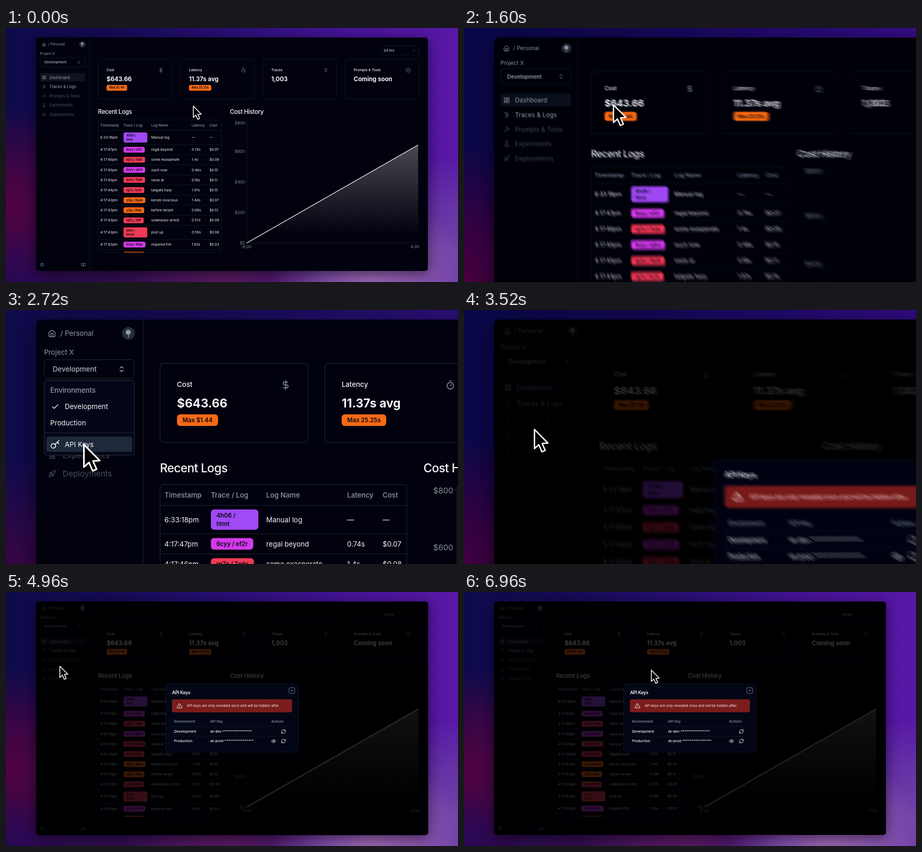
An HTML page with a canvas for the animation above (7.04 s loop, 856x482 px).

```html
<!DOCTYPE html>
<html lang="en">
<head>
<meta charset="utf-8">
<title>Dashboard</title>
<style>
html, body { margin: 0; width: 100%; height: 100%; overflow: hidden; background: #0d0a4c; }
canvas { display: block; width: 856px; height: 482px; }
</style>
</head>
<body>
<canvas id="stage" width="856" height="482"></canvas>
<script>
const W = 856, H = 482, LOOP = 7040, STEP = 80;
const OX = 57, OY = 17.7; // zoom anchor: top left of the window
const out = document.getElementById('stage').getContext('2d');
const layer = document.createElement('canvas');
layer.width = 940;
layer.height = 540;
const g = layer.getContext('2d');

const SM = 6.6, MD = 7.55, LG = 8.5, XL = 11.33, XS = 5.66;
const WHITE = '#f5f7fb', MUTED = '#929aa8', DIM = '#484d58', LINE = '#181e2b', BG = '#01020e';
const PURPLE = '#a049f4', PINK = '#d23aea', RED = '#f03a55', ORANGE = '#f66a14';

const RING = 'M22 12a10 10 0 1 1-20 0a10 10 0 0 1 20 0z';
const ICONS = {
  home: 'M3 9l9-7 9 7v11a2 2 0 0 1-2 2H5a2 2 0 0 1-2-2zM9 22V12h6v10',
  grid: 'M3 3h7v9H3zM14 3h7v5h-7zM14 12h7v9h-7zM3 16h7v5H3z',
  traces: 'M4 5h11M9 12h11M7 19h9',
  hammer: 'M15 12l-8.5 8.5a2.1 2.1 0 0 1-3-3L12 9M17.6 15L22 10.6M20.9 11.7L18.7 8.2v-.8L16 4.6A5.6 5.6 0 0 0 12 3H9l.9.8A6.2 6.2 0 0 1 12 8.4V10l2 2h2.5l2.3 1.9',
  flask: 'M10 2v7.3L4 20a1.5 1.5 0 0 0 1.3 2h13.4a1.5 1.5 0 0 0 1.3-2L14 9.3V2M8.5 2h7M7 16h10',
  rocket: 'M4.5 16.5c-1.5 1.3-2 5-2 5s3.7-.5 5-2a2.1 2.1 0 0 0-3-3zM12 15l-3-3a22 22 0 0 1 2-4A13 13 0 0 1 22 2c0 2.7-.8 7.5-6 11a22 22 0 0 1-4 2zM9 12H4s.6-3 2-4c1.6-1.1 5 0 5 0M12 15v5s3-.6 4-2c1.1-1.6 0-5 0-5',
  updown: 'M7 15l5 5 5-5M7 9l5-5 5 5',
  dollar: 'M12 1v22M17 5H9.5a3.5 3.5 0 0 0 0 7h5a3.5 3.5 0 0 1 0 7H6',
  timer: 'M10 2h4M12 14l3-3M20 14a8 8 0 1 1-16 0a8 8 0 0 1 16 0z',
  alert: RING + 'M12 7v5M12 16v.2',
  help: RING + 'M9 9a3 3 0 0 1 5.8 1c0 2-3 3-3 3M12 17v.2',
  book: 'M2 4h6a4 4 0 0 1 4 4v13a3 3 0 0 0-3-3H2zM22 4h-6a4 4 0 0 0-4 4v13a3 3 0 0 1 3-3h7z',
  check: 'M20 6L9 17l-5-5',
  key: 'M11.2 12.8L21 3M17 7l3.5 3.5M13 16a5.5 5.5 0 1 1-11 0a5.5 5.5 0 0 1 11 0z',
  close: 'M18 6L6 18M6 6l12 12',
  warn: 'M10.3 3.9L1.8 18a2 2 0 0 0 1.7 3h17a2 2 0 0 0 1.7-3L13.7 3.9a2 2 0 0 0-3.4 0zM12 9v4M12 17v.2',
  refresh: 'M3 12a9 9 0 0 1 15-6.7L21 8M21 3v5h-5M21 12a9 9 0 0 1-15 6.7L3 16M3 21v-5h5',
  eye: 'M2 12s3-7 10-7 10 7 10 7-3 7-10 7-10-7-10-7zM15 12a3 3 0 1 1-6 0a3 3 0 0 1 6 0z'
};
for (const k in ICONS) ICONS[k] = new Path2D(ICONS[k]);

const LOGS = [
  ['6:33:18pm', '4h06 / htmt', 'Manual log', '—', '—', PURPLE, 2],
  ['4:17:47pm', '6cyy / ef2r', 'regal beyond', '0.74s', '$0.07', PINK],
  ['4:17:46pm', 'rg7x / 7xde', 'some exasperate', '1.4s', '$0.08', RED],
  ['4:17:45pm', '6cyy / g6ol', 'ouch now', '0.46s', '$0.15', PINK],
  ['4:17:45pm', 'qykx / 5pi6', 'seize at', '0.18s', '$0.11', RED],
  ['4:17:44pm', 'rg7x / bcih', 'tailgate harp', '1.97s', '$0.15', RED],
  ['4:17:43pm', 'y2ju / 9qub', 'kendo vivacious', '1.44s', '$0.07', ORANGE],
  ['4:17:43pm', 'y2ju / 8hkj', 'before tenant', '0.09s', '$0.13', ORANGE],
  ['4:17:43pm', 'rg7x / 7dff', 'underpass arrest', '0.57s', '$0.09', RED],
  ['4:17:43pm', 'qykx / bevm', 'psst up', '0.59s', '$0.08', RED, 2],
  ['4:17:42pm', '6cyy / 85ar', 'required fire', '1.83s', '$0.03', PINK],
  ['4:17:42pm', 'y2ju / 3kfa', 'plain river', '0.66s', '$0.06', ORANGE]
];

const clamp = v => Math.max(0, Math.min(1, v));
const ramp = (t, a, b) => clamp((t - a) / (b - a));
const smooth = p => p * p * p * (p * (6 * p - 15) + 10);

// y is the vertical centre of the capitals
function text(s, x, y, size, color = WHITE, weight = 400, align = 'left', track = 0) {
  g.font = `${weight} ${size}px Inter, sans-serif`;
  g.letterSpacing = track * size + 'px';
  g.textAlign = align;
  g.fillStyle = color;
  g.fillText(s, x, y + size * 0.36);
}

function box(x, y, w, h, r, fill, stroke) {
  g.beginPath();
  g.roundRect(x, y, w, h, r);
  if (fill) { g.fillStyle = fill; g.fill(); }
  if (stroke) { g.strokeStyle = stroke; g.lineWidth = 0.7; g.stroke(); }
}

function line(x1, y1, x2, y2, color = LINE, width = 0.7) {
  g.beginPath();
  g.moveTo(x1, y1);
  g.lineTo(x2, y2);
  g.strokeStyle = color;
  g.lineWidth = width;
  g.stroke();
}

function icon(name, x, y, size, color, weight = 2) {
  g.save();
  g.translate(x - size / 2, y - size / 2);
  g.scale(size / 24, size / 24);
  g.strokeStyle = color;
  g.lineWidth = weight;
  g.lineCap = g.lineJoin = 'round';
  g.stroke(ICONS[name]);
  g.restore();
}

function badge(s, x, y, color, lines = 1) {
  g.font = `600 ${XS}px Inter, sans-serif`;
  g.letterSpacing = '0px';
  const ink = '#0a0815';
  if (lines === 2) {
    const parts = s.split('/ ');
    box(x, y - 9.6, 45, 19.2, 3, color);
    text(parts[0] + '/', x + 5.2, y - 3.8, XS, ink, 600);
    text(parts[1], x + 5.2, y + 3.9, XS, ink, 600);
  } else {
    box(x, y - 5.5, g.measureText(s).width + 10.4, 11, 3, color);
    text(s, x + 5.2, y, XS, ink, 600);
  }
}

function backdrop() {
  const lin = g.createLinearGradient(0, 0, W, 0);
  [[0, '#0d0a4a'], [0.25, '#160a58'], [0.5, '#2a0f78'], [0.75, '#46139a'], [1, '#5918a6']]
    .forEach(([p, c]) => lin.addColorStop(p, c));
  g.fillStyle = lin;
  g.fillRect(-60, -60, 1100, 700);
  [[200, 500, 300, '50,12,78'], [0, 335, 190, '82,3,66'], [0, 500, 120, '42,8,88'],
   [420, 500, 210, '92,26,96'], [856, 430, 190, '112,68,166'], [690, 500, 190, '160,108,180']]
    .forEach(([x, y, r, c]) => {
      const rad = g.createRadialGradient(x, y, 0, x, y, r);
      rad.addColorStop(0, `rgba(${c},1)`);
      rad.addColorStop(0.5, `rgba(${c},.6)`);
      rad.addColorStop(1, `rgba(${c},0)`);
      g.fillStyle = rad;
      g.fillRect(x - r, y - r, 2 * r, 2 * r);
    });
}

function sidebar(hover) {
  line(158.5, 18, 158.5, 461, '#141822');
  icon('home', 72, 31, 7.6, MUTED);
  text('/ Personal', 80, 31, SM, MUTED);
  g.fillStyle = '#282d39';
  g.beginPath(); g.arc(144.5, 31, 6, 0, 7); g.fill();
  g.fillStyle = '#8d98ae';
  g.beginPath(); g.arc(144.3, 30, 2.4, 0, 7); g.fill();
  line(144.5, 31, 144.5, 35, '#8d98ae');
  text('Project X', 64.6, 49, SM, MUTED);
  box(64.7, 56, 85.3, 17.6, 3, hover ? '#1b222d' : null, LINE);
  text('Development', 72.7, 65, SM, hover ? WHITE : '#aeb4bf', 500);
  icon('updown', 138, 65, 7.2, '#aeb4bf');
  box(64.7, 85.5, 85.3, 16, 2, '#0e131f');
  [['grid', 'Dashboard', '#9299a5'], ['traces', 'Traces & Logs', '#a0a6b1'], ['hammer', 'Prompts & Tools', DIM],
   ['flask', 'Experiments', DIM], ['rocket', 'Deployments', DIM]].forEach(([i, s, c], n) => {
    const y = 93.8 + n * 17.65;
    icon(i, 72.3, y, 7.6, c);
    text(s, 82.2, y, MD, c);
  });
  icon('help', 68.2, 449.2, 7.5, MUTED);
  icon('book', 146.3, 449.2, 8, MUTED);
}

function cards() {
  box(709.5, 33.8, 73, 17.6, 3, null, LINE);
  text('24 hrs', 715.3, 42.6, SM);
  icon('updown', 772.3, 42.6, 6.5, '#6d7380');
  [['Cost', '$643.66', 'dollar', 'Max $1.44'], ['Latency', '11.37s avg', 'timer', 'Max 25.25s'],
   ['Traces', '1,003', 'traces'], ['Prompts & Tools', 'Coming soon', 'alert']].forEach(([s, v, i, b], n) => {
    const x = 174.5 + n * 156;
    box(x, 59.5, 140.2, 75.2, 4, null, LINE);
    text(s, x + 16, 79.3, SM, WHITE, 500);
    text(v, x + 16, 97.3, XL, WHITE, 700);
    icon(i, x + 119, 80, 9.3, '#868d99');
    if (b) badge(b, x + 16, 113.4, ORANGE);
  });
}

function table() {
  text('Recent Logs', 174.3, 159, XL, WHITE, 500, 'left', -0.025);
  const cols = [178.6, 222.6, 275, 351.7, 385.3];
  g.save();
  g.beginPath();
  g.rect(174, 174, 235, 252);
  g.clip();
  box(174.5, 174.6, 233.6, 251, [3, 3, 0, 0], null, LINE);
  ['Timestamp', 'Trace / Log', 'Log Name', 'Latency', 'Cost']
    .forEach((s, i) => text(s, cols[i], 184.4, SM, MUTED, 500));
  let y = 194.4;
  for (const [time, id, name, lat, cost, color, lines] of LOGS) {
    const h = lines ? 26.9 : 19.15, mid = y + h / 2;
    line(174.5, y, 408, y);
    badge(id, cols[1], mid, color, lines);
    [time, , name, lat, cost].forEach((s, i) => text(s, cols[i], mid, SM));
    y += h;
  }
  g.restore();
}

function chart() {
  text('Cost History', 424, 159, XL, WHITE, 500, 'left', -0.025);
  const grey = '#868b96', axis = '#23272f';
  line(456, 176, 456, 408, axis);
  line(456, 408, 780.5, 408, axis);
  [['$800', 180], ['$600', 234.3], ['$400', 292.3], ['$200', 350.3], ['$0', 408.3]].forEach(([s, y]) => {
    text(s, 452.3, y, MD, grey, 400, 'right');
    line(453.5, y, 456, y, axis);
  });
  text('6:00', 456, 415, MD, grey, 400, 'center');
  text('4:00', 782.8, 415, MD, grey, 400, 'right');
  const fade = g.createLinearGradient(0, 222, 0, 392);
  fade.addColorStop(0, 'rgba(255,255,255,.28)');
  fade.addColorStop(1, 'rgba(255,255,255,0)');
  g.fillStyle = fade;
  g.beginPath();
  g.moveTo(456, 408);
  g.lineTo(780.5, 222);
  g.lineTo(780.5, 408);
  g.fill();
  line(456, 408, 780.5, 222, WHITE, 1.4);
}

function dropdown(p, cy) {
  if (p <= 0) return;
  g.save();
  g.globalAlpha = p;
  const k = 0.95 + 0.05 * p;
  g.translate(107.4, 75.6 - 3.8 * (1 - p));
  g.scale(k, k);
  box(-42.6, 0, 85.2, 71, 3, '#020617', '#1e2635');
  const rel = cy - 75.6;
  const row = [25, 40.5, 60.7].find(y => Math.abs(rel - y) < 7.6);
  if (row) box(-40.7, row - 7.2, 81.4, 14.4, 2, '#1e293b');
  text('Environments', -37, 9.6, SM, MUTED, 500);
  icon('check', -32.3, 25, 8, WHITE);
  text('Development', -23.3, 25, SM);
  text('Production', -37, 40.5, SM);
  line(-42.6, 50, 42.6, 50, '#1e2635');
  icon('key', -32.3, 60.7, 9.4, WHITE);
  text('API Keys', -23.3, 60.7, SM);
  g.restore();
}

function dialog(p) {
  if (p <= 0) return;
  g.save();
  g.globalAlpha = p;
  g.fillStyle = 'rgba(0,0,0,.77)';
  g.fillRect(50, 10, 760, 460);
  g.translate(428, 239);
  g.scale(0.95 + 0.05 * p, 0.95 + 0.05 * p);
  g.translate(-428, -239);
  box(302.6, 174.7, 250.6, 128.8, 3.5, '#020615', '#162035');
  text('API Keys', 314.4, 191.2, LG, WHITE, 600, 'left', -0.025);
  box(535.6, 181.4, 11, 11, 2.5, null, '#8791a1');
  icon('close', 541.1, 186.9, 7.6, '#a5adba');
  box(314.6, 204, 226.6, 23.8, 3, '#7a1c1c', '#942222');
  icon('warn', 328.4, 215.8, 11, WHITE);
  text('API keys are only revealed once and will be hidden after.', 342.2, 215.9, SM, '#fbeeee');
  [['Environment', 318.4], ['API Key', 386.3], ['Actions', 502]]
    .forEach(([s, x]) => text(s, x, 245.8, SM, MUTED, 500));
  line(314.6, 255.2, 541.2, 255.2);
  line(314.6, 273.8, 541.2, 273.8);
  [['Development', 'sk-dev-'], ['Production', 'sk-prod-']].forEach(([env, key], i) => {
    const y = 264.7 + 18.2 * i;
    text(env, 318.4, y, SM, WHITE, 500);
    text(key + '*'.repeat(16), 386.3, y, SM, WHITE, 500);
    icon('refresh', 525.3, y, 9.6, WHITE);
  });
  icon('eye', 506.8, 282.9, 9.6, WHITE);
  g.restore();
}

// critically damped spring, 0 to 1
function spring(ms) {
  const x = Math.max(0, ms) * 0.00632;
  return 1 - (1 + x) * Math.exp(-x);
}
const zoom = t => 1 + spring(t - 1299) - spring(t - 3346);

const STOPS = [[354.7, 148.3], [107.6, 69.7], [102, 140.7], [354.7, 148.3]];
const MOVES = [[1210, 1900], [2240, 2840], [6080, 6960]];
function pointer(t) {
  let [x, y] = STOPS[0];
  MOVES.forEach(([a, b], i) => {
    const p = smooth(ramp(t, a, b));
    x += (STOPS[i + 1][0] - STOPS[i][0]) * p;
    y += (STOPS[i + 1][1] - STOPS[i][1]) * p;
  });
  return [x, y];
}

function arrow(c) {
  c.beginPath();
  [[0, 0], [0, 21.4], [4.8, 17], [8.3, 25], [12, 23.4], [8.6, 15.6], [15, 15.2]]
    .forEach(([x, y]) => c.lineTo(x, y));
  c.closePath();
  c.lineJoin = 'round';
  c.fillStyle = '#000';
  c.fill();
  c.strokeStyle = '#fff';
  c.lineWidth = 1.5;
  c.stroke();
}

function hand(c) {
  c.rotate(-0.42);
  const p = new Path2D();
  p.roundRect(-1.7, -0.6, 3.4, 12, 1.7);
  p.roundRect(1.4, 5.6, 3.2, 7, 1.6);
  p.roundRect(4.2, 6.2, 3.2, 7, 1.6);
  p.roundRect(6.8, 7.2, 2.9, 6, 1.4);
  p.roundRect(-1.7, 8.6, 11.4, 8, [1, 1, 4, 4]);
  p.ellipse(-2.4, 10.6, 1.5, 3.3, -0.6, 0, 7);
  c.strokeStyle = '#000';
  c.lineWidth = 1.3;
  c.stroke(p);
  c.fillStyle = '#fff';
  c.fill(p);
  c.lineWidth = 0.7;
  c.beginPath();
  [2.2, 4.8, 7.2].forEach(x => { c.moveTo(x, 8.8); c.lineTo(x, 13.4); });
  c.stroke();
}

function draw(t) {
  const s = zoom(t), [cx, cy] = pointer(t);
  const hovering = t >= 1760 && t < 2080;
  g.setTransform(s, 0, 0, s, OX * (1 - s), OY * (1 - s));
  backdrop();
  g.save();
  g.shadowColor = 'rgba(0,0,0,.55)';
  g.shadowBlur = 26 * s;
  g.shadowOffsetY = 5 * s;
  box(57, 18, 742, 443, 5, BG);
  g.restore();
  g.save();
  g.beginPath();
  g.roundRect(57, 18, 742, 443, 5);
  g.clip();
  sidebar(hovering);
  cards();
  table();
  chart();
  dropdown(t < 3040 ? ramp(t, 1952, 2102) : 0, cy);
  dialog(ramp(t, 3020, 3220));
  g.restore();

  // motion blur: average the layer over a short shutter
  const spread = zoom(t + 8) - zoom(t - 8);
  const n = Math.abs(spread) > 0.002 ? 9 : 1;
  for (let i = 0; i < n; i++) {
    const k = n > 1 ? 1 + spread * (i / (n - 1) - 0.5) / s : 1;
    out.setTransform(k, 0, 0, k, OX * (1 - k), OY * (1 - k));
    out.globalAlpha = 1 / (i + 1);
    out.drawImage(layer, 0, 0);
  }
  out.globalAlpha = 1;
  out.setTransform(s, 0, 0, s, OX + (cx - OX) * s, OY + (cy - OY) * s);
  (hovering ? hand : arrow)(out);
}

let last = -1;
const start = performance.now();
function tick() {
  const t = Math.floor(((performance.now() - start) % LOOP) / STEP) * STEP;
  if (t !== last) draw(last = t);
  requestAnimationFrame(tick);
}
tick();
</script>
</body>
</html>
```
